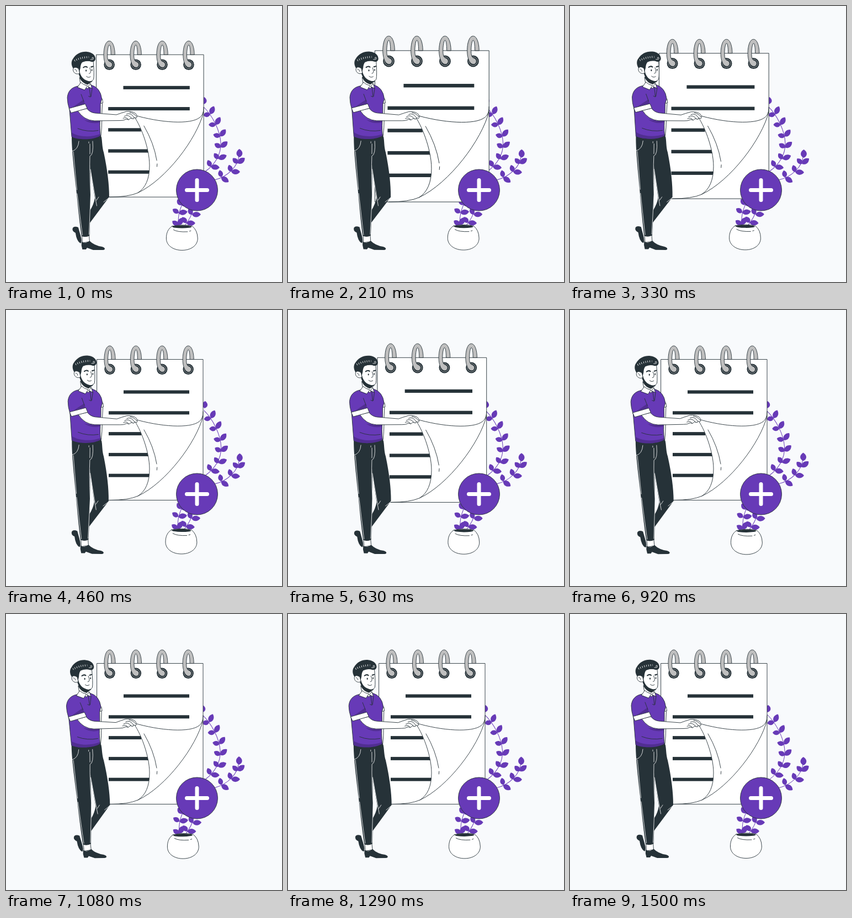
Write an HTML page that moves like this. It is 500 px wide and 500 px high and loops after 1540 ms.

```html
<!DOCTYPE html>
<html lang="en">
<head>
<meta charset="utf-8">
<title>Add a note</title>
<style>
  html, body { margin: 0; width: 100%; height: 100%; overflow: hidden; background: #f8fafc; }
  svg { display: block; width: 100%; height: 100%; }
  .ink, .paper { fill: none; stroke: #263238; stroke-width: .9; stroke-linecap: round; stroke-linejoin: round; }
  .paper { fill: #fff; }
  .dark { fill: #263238; }
  .violet { fill: #673ab7; }
  .shade { fill: #512e92; }
  .seam { fill: none; stroke: #fff; stroke-width: .8; stroke-linecap: round; }
  .stem { fill: none; stroke: #673ab7; }
  .brow { fill: none; stroke: #263238; stroke-width: 2; stroke-linecap: round; }
</style>
</head>
<body>
<svg viewBox="0 0 500 500">
  <g id="plant">
    <path class="stem" d="M313 399C310 378 316 362 330 340L362 299C377 288 390 270 389 248S374 198 357 182"/>
    <path class="stem" d="M323 399Q336 383 339 368L378 315C402 309 421 290 422 270"/>
    <g id="leaves" class="violet"></g>
    <path class="paper" d="M301 399C293 404 290.5 412 290.5 421C290.5 434 303 442.5 319 442.5S347.3 434 347.3 421Q347 406 337 398.5Q319 395 301 399Z"/>
    <ellipse class="dark" cx="319" cy="400" rx="17.5" ry="2.6"/>
    <path class="ink" d="M303.5 405.5Q311 410 329 409M332.5 408L335 407.2"/>
  </g>

  <g id="pad">
    <rect class="paper" x="165" y="89.5" width="192" height="255"/>
    <g id="lines" class="dark"></g>
    <path fill="#fff" d="M230 197C243 213 260 256 260 288Q260 324 239 337C290 313 340 240 357 190C350 217 280 212 230 197Z"/>
    <path class="ink" d="M357 184C357 192 355 198 350 202C334 215 280 212 230 197C243 213 260 256 260 288Q260 324 239 337"/>
    <path class="ink" d="M357 192C345 240 290 313 239 337Q222 344.5 188 344.5"/>
    <path class="ink" d="M250 217Q268 248 273 279M273.7 285L273.3 290"/>
    <g id="rings"></g>
  </g>

  <circle class="violet" cx="346" cy="333.5" r="37.5" stroke="#263238" stroke-width=".9"/>
  <path fill="none" stroke="#fff" stroke-width="7" stroke-linecap="round" d="M327.5 333.5h37M346 315.5v36"/>

  <g id="man">
    <!-- legs and shoes -->
    <path class="dark" d="M121 402Q124 398 131 401L135 415Q139 428 135 430Q128 426 126 411Q119 408 121 402Z"/>
    <path class="dark" d="M140 240Q160 242 171 234C175 237 173 252 177 265Q187 312 187 346L152 393V371Q159 360 161 348L153 296L150 260Z"/>
    <path class="paper" d="M138 415H150.5L151.5 427L139 429Z"/>
    <path class="dark" d="M137 427Q144 432 151.5 425.500Q160 434 174 436C180 437.5 181 441.5 176 442H158L147 438L145 441H138.500Q136 434 137 427Z"/>
    <path class="dark" d="M119 237Q139 243 160 240L157 262Q152 280 153 300Q154 355 151.5 416Q145 420 137 417C133 390 129 350 127 330S119 265 119 237Z"/>
    <path class="seam" d="M120 263Q131 260 132 245M122 264L128.500 333M129 340L138.500 415M150 246V248.500M157 245Q159 270 152 272Q151 300 153.500 342L150.500 414"/>
    <path class="seam" d="M152 250V268M153 296Q160 338 164.500 362M164 352L168 346M177 355L187 347"/>

    <!-- far arm -->
    <path class="paper" d="M168 170L174.500 177C173 198 174.500 216 172 235L168 230Z"/>
    <path class="paper" d="M166 170L174.500 168.500L175.500 175.500L167 177Z"/>

    <!-- shirt -->
    <path class="violet" stroke="#263238" stroke-width=".9" d="M131 145C119 147 112 154 111 166Q111 176 115 188L119 237C132 243.5 160 242.5 171 235Q169 218 171 195V177L173.500 168Q171 148 154 143Z"/>
    <path class="shade" d="M118.500 229C132 238 155 238 170.500 232V235C160 242.500 132 243.500 119.500 237Z"/>
    <path class="shade" d="M141 206Q152 209 170 207.500V211Q154 215 141 206ZM121 183L140 170L143 177Z"/>
    <path class="ink" d="M130 222Q148 229 167 225.500M136 160L141 173M151 148L153 165L149.500 163.500M156 149L154 164"/>

    <!-- neck and collar -->
    <path class="paper" d="M133 130L135 142L148 150L153 142Z"/>
    <path class="dark" d="M133.500 125Q138 139 153 138.500L148 142.500Q138 140 133.500 131Z"/>
    <path class="paper" d="M129.500 147L135.500 138.500Q140 143 147.500 144.500L142.500 152ZM148.500 146L153 140.500L155.500 149Z"/>

    <!-- head -->
    <path class="paper" d="M131 103Q145 97 158 100Q160 124 158.500 133Q153 140 143 136Q134 130 132 122Z"/>
    <path class="dark" d="M132 112Q134 130 145 134.500Q152 138 157 135.500Q151 143 141.500 137.500Q133 131 131 121Z"/>
    <path class="dark" d="M124 116C118 110 117 101 121 96C127 86 137 82 147 83C156 84 162 89 162 96Q161 102 154.500 101Q147 98 138 102Q135 105 134.500 113L132.500 121L129 113Z"/>
    <path class="paper" d="M133 122C129 125 122 122 121.500 116S128 110 131.500 114Z"/>
    <path class="seam" stroke-linecap="butt" style="stroke-width:3.5;stroke-dasharray:.8 3;stroke-linecap:butt" d="M124 99Q135 93 150 92.500"/>
    <path class="seam" d="M153 97Q160 98 158 93.500Q155 92 156 95.500"/>
    <path class="brow" d="M140 111.500Q144 108.500 147 111M154 110.500L157.500 109.500"/>
    <ellipse class="dark" cx="145" cy="117" rx="1.1" ry="1.7"/>
    <ellipse class="dark" cx="155.5" cy="116" rx="1" ry="1.6"/>
    <path class="ink" d="M151.500 112Q156 122 150.500 122.500M145.500 127.500Q149 131 153 128M124.500 115Q128 115 128 119"/>

    <!-- near arm and hand -->
    <path class="paper" d="M146.500 186Q152 193 161 194L200 197Q208 194 218 191Q229 190 235 195Q239 200 236 203L232 202L231 204.500L226 203L222.500 206L218 205Q212 208 206 207.500L160 208Q141 207 130 190Z"/>
    <path class="ink" d="M218 196Q226 192 232 202M214 200Q222 195 228 204M212 203.500Q218 200 222 206M224 192.500Q232 194 236 200"/>
    <path class="paper" d="M114.500 185.500L143.500 177.500L147 185.500L118 193.500Z"/>
  </g>
</svg>
<script>
const $ = id => document.getElementById(id);

const leaf = (x, y, deg, len, w) =>
  `<path transform="translate(${x} ${y}) rotate(${deg})" d="M0 0C${len * .2} ${-w * .7} ${len * .7} ${-w * .75} ${len} 0C${len * .7} ${w * .75} ${len * .2} ${w * .7} 0 0Z"/>`;

// A small and a large leaf share each node of a stem
const pair = ([x, y, small, large]) => leaf(x, y, small, 13, 8) + leaf(x, y, large, 16, 8.8);

$('leaves').innerHTML = leaf(358, 178, -85, 13, 9) + leaf(423, 274, -91, 15, 10) + [
  [370, 196, 172, -65], [380, 215, 180, -60], [388, 236, 193, -52],
  [389, 256, 210, -40], [385, 277, 232, -24], [371, 291, 245, 6],
  [420, 285, 225, -38], [408, 300, 252, 2], [390, 310, 258, 33],
  [313, 375, 212, -8], [337, 378, 243, -2], [312, 397, 215, -58],
  [327, 393, 233, 2], [318, 361, 235, -20]
].map(pair).join('');

$('lines').innerHTML = [[213, 332], [186, 332], [186, 245], [186, 262], [186, 264]]
  .map(([a, b], i) => `<rect x="${a}" y="${145.5 + i * 37.8}" width="${b - a}" height="6"/>`).join('');

const ring = x => `<g transform="translate(${x} 0)">
  <circle class="dark" cy="107.3" r="9.7"/>
  <circle cy="107.3" r="7.3" fill="none" stroke="#bfbfbf" stroke-width=".7"/>
  <path fill="#bfbfbf" stroke="#263238" stroke-width=".9" d="M3 89.5C3 80 2 72 0 72S-3.5 82 -3.5 90Q-3.5 101 1 102C6 103.5 7 109 3 112C-5 115 -10 103 -10 90C-10 75 -6 65 0 65S10 76 10 89.5Z"/></g>`;
$('rings').innerHTML = [0, 1, 2, 3].map(i => ring(188 + i * 47.4)).join('');

// Linear interpolation through [position, value] stops
function along(stops, p) {
  let i = 1;
  while (i < stops.length - 1 && p > stops[i][0]) i++;
  const [a, u] = stops[i - 1], [b, v] = stops[i];
  return u + (v - u) * (p - a) / (b - a);
}

const LOOP = 1540, CYCLE = 1500, STEP = 1000 / 24, LEAD = 17;
const beat = [[0, 1], [.1, 1.1], [.3, 1], [.4, 1], [.5, 1.1], [.6, 1], [1, 1]];
const sway = [[0, 0], [.25, 1], [.75, -1], [1, 0]];

function draw(ms) {
  // The motion advances at 24 steps per second
  const n = Math.floor((ms % LOOP + 5) / STEP) % 37;
  const p = Math.min(n * STEP + LEAD, CYCLE) / CYCLE;
  const s = along(beat, p), a = along(sway, p);
  $('pad').setAttribute('transform', `translate(261 205) scale(${s}) translate(-261 -205)`);
  $('man').setAttribute('transform', `rotate(${a} 174 262)`);
  $('plant').setAttribute('transform', `rotate(${a} 363 304)`);
}

let start;
function tick(now) {
  start ??= now;
  draw(now - start);
  requestAnimationFrame(tick);
}
draw(0);
requestAnimationFrame(tick);
</script>
</body>
</html>
```
